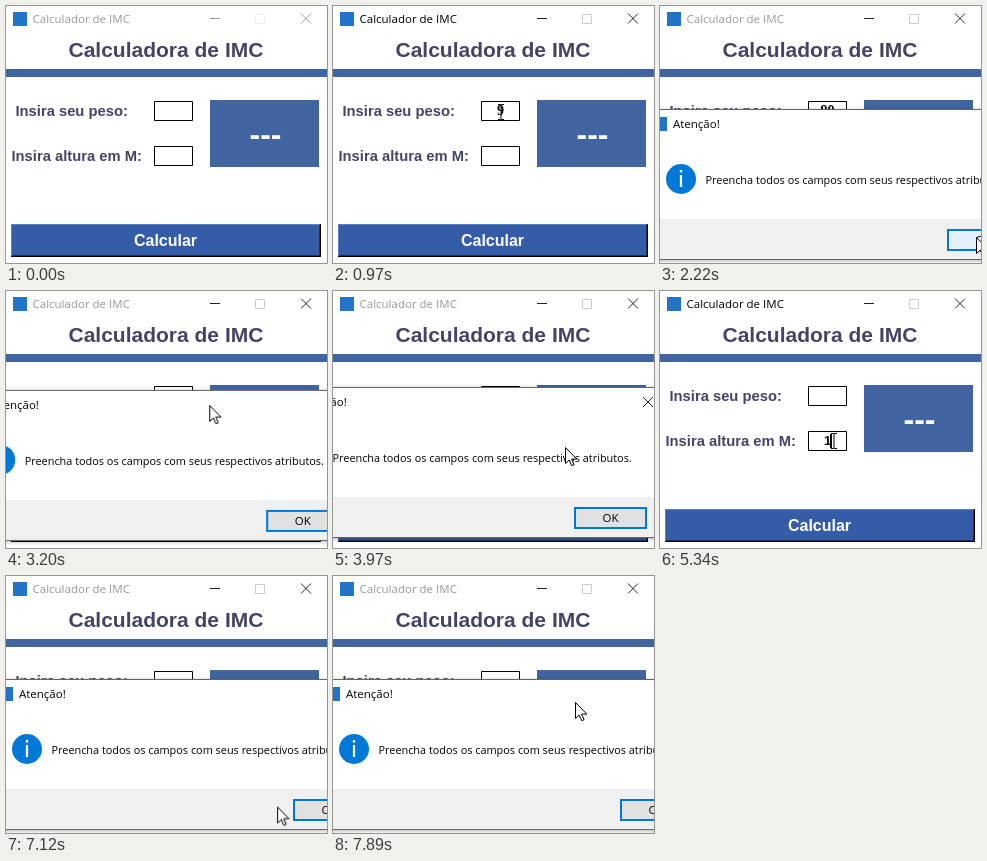
Recreate the animation shown at these times as an HTML page. Size 321 by 257 pixels, loop 8000 ms.

```html
<!DOCTYPE html>
<html lang="pt">
<head>
<meta charset="utf-8">
<title>Calculador de IMC</title>
<style>
html, body { margin: 0; width: 100%; height: 100%; overflow: hidden; background: #fff; }
#stage { position: relative; width: 321px; height: 257px; overflow: hidden; background: #fff; }
#stage > * { position: absolute; left: 0; top: 0; overflow: visible; animation: 8s linear infinite; }
svg * { animation: 8s step-end infinite; }

.ui { font: 11.5px "Open Sans", "Noto Sans", sans-serif; }
.msg { font-size: 10.9px; }
.bold { font: bold 14.75px "Liberation Sans", Arial, sans-serif; fill: #444466; }
.head { font-size: 21px; }
.go { font-size: 16px; fill: #fff; }
.result { font-size: 32px; fill: #fff; }
.line { fill: none; stroke-width: 1; }

#caption { animation-name: caption; }
#controls { animation-name: controls; }
#maximize { animation-name: maximize; }
#raised { animation-name: raised; }
#ridge { animation-name: ridge; }

#stage > .field { width: 39px; left: 148px; height: 20px; line-height: 20px; text-align: center; white-space: pre; }
.field::after { content: ""; animation: 8s step-end infinite; }
#weight { top: 95px; font: bold 14px "Liberation Serif", "Times New Roman", serif; }
#weight::after { animation-name: weight; }
#height { top: 140px; font: bold 13px "Liberation Sans", Arial, sans-serif; }
#height::after { animation-name: height; }
#stage > #caret { top: 143px; width: 2px; height: 14px; background: #000; animation: caret 8s step-end infinite; }

#stage > #dialog { left: -13px; top: 103px; filter: drop-shadow(0 1px 2px rgba(0,0,0,.3));
  animation: popup 8s step-end infinite, drag 8s linear infinite; }
#ok { animation-name: ok; }

#stage > #pointer { animation-name: pointer; }
#arrow { animation-name: arrow; }
#beam { animation-name: beam; }

@keyframes caption {
  0%, 20.65%, 86.3% { fill: #999; }
  7%, 54% { fill: #000; }
  100% { fill: #999; }
}
@keyframes controls { 0% { stroke: #999; } 7%, 100% { stroke: #222; } }
@keyframes maximize { 0% { stroke: #eee; } 7%, 100% { stroke: #ccc; } }
@keyframes raised {
  0%, 2.4%, 23%, 89% { opacity: 1; }
  1.2%, 18.1%, 82.2% { opacity: 0; }
  100% { opacity: 1; }
}
@keyframes ridge {
  0%, 2.4%, 23%, 89% { opacity: 0; }
  1.2%, 18.1%, 82.2% { opacity: 1; }
  100% { opacity: 0; }
}
@keyframes weight {
  0%, 54%, 100% { content: ""; }
  11.2% { content: "9"; }
  12.9% { content: "90"; }
}
@keyframes height {
  0%, 100% { content: ""; }
  66.65% { content: "1"; }
  70.1% { content: "1,"; }
  73.3% { content: "1,7"; }
  75.8% { content: "1,70"; }
}
@keyframes caret {
  0%, 74.2%, 100% { left: 171px; opacity: 0; }
  66.65% { left: 170px; opacity: 1; }
  70.1% { left: 172px; opacity: 1; }
  73.3% { left: 176px; opacity: 1; }
}
@keyframes popup {
  0%, 54.9% { opacity: 0; scale: .965; }
  20.65%, 86.3% { opacity: .16; scale: .965; }
  21.6%, 87.2% { opacity: .5; scale: .98; }
  22.5%, 88.1% { opacity: .8; scale: .993; }
  23.4%, 89% { opacity: 1; scale: 1; }
  53.1% { opacity: .6; scale: .985; }
  54% { opacity: .2; scale: .97; }
  100% { opacity: 1; scale: 1; }
}
@keyframes drag {
  0%, 32.5% { translate: 0 0; }
  41.75% { translate: -33px -5px; }
  45.5%, 60% { translate: -46px -7px; }
  60.1%, 100% { translate: 0 0; }
}
@keyframes ok {
  0%, 28.8%, 55%, 96.2% { fill: #e1e1e1; }
  25.8%, 51.8%, 94.5% { fill: #e5f1fb; }
  100% { fill: #e1e1e1; }
}
@keyframes pointer {
  0%, .8% { translate: 112px 262px; }
  6.1%, 13.75% { translate: 168px 106px; }
  18.75%, 22% { translate: 184px 232px; }
  27%, 28.6% { translate: 316px 231px; }
  32%, 32.5% { translate: 230px 118px; }
  41.75% { translate: 197px 113px; }
  45.5%, 46.8% { translate: 184px 111px; }
  49.5%, 50.5% { translate: 232px 156px; }
  52.3%, 54% { translate: 277px 227px; }
  60%, 76.2% { translate: 174px 150px; }
  83.5%, 87.5% { translate: 263px 232px; }
  95.9% { translate: 308px 224px; }
  98.5%, 100% { translate: 242px 126px; }
}
@keyframes arrow {
  0%, 14.4%, 77% { opacity: 1; }
  5.6%, 59.4% { opacity: 0; }
  100% { opacity: 1; }
}
@keyframes beam {
  0%, 14.4%, 77% { opacity: 0; }
  5.6%, 59.4% { opacity: 1; }
  100% { opacity: 0; }
}
</style>
</head>
<body>
<div id="stage">
  <svg width="321" height="257">
    <rect x="7" y="6" width="14" height="14" fill="#2274c8"/>
    <text id="caption" class="ui" x="26.5" y="17">Calculador de IMC</text>
    <path id="maximize" class="line" d="M249.500 8.500h9v9h-9z"/>
    <path id="controls" class="line" d="M204 12.500h10M295 7.500l10 10M305 7.500l-10 10"/>

    <text class="bold head" x="62.500" y="51">Calculadora de IMC</text>
    <rect y="63" width="321" height="8" fill="#4065a1"/>

    <text class="bold" x="9.500" y="110">Insira seu peso:</text>
    <text class="bold" x="5.500" y="155">Insira altura em M:</text>
    <path class="line" stroke="#000" d="M148.500 95.500h38v19h-38zM148.500 140.500h38v19h-38z"/>

    <rect x="204" y="94" width="109" height="67" fill="#4065a1"/>
    <text class="bold result" x="259.500" y="139" text-anchor="middle">---</text>

    <rect x="5" y="218" width="310" height="33" fill="#355ca6"/>
    <g id="raised" class="line">
      <path d="M5.500 250V218.500H314" stroke="#5d80c4"/>
      <path d="M6 249.500H313.500V219" stroke="#1b3260"/>
      <path d="M5 250.500H314.500V218" stroke="#000"/>
    </g>
    <g id="ridge" class="line">
      <path d="M5.500 250V218.500H314M7 249.500H313.500V220" stroke="#7f9cd6"/>
      <path d="M6.500 249V219.500H313M5 250.500H314.500V218" stroke="#1b3260"/>
    </g>
    <text class="bold go" x="159.500" y="240" text-anchor="middle">Calcular</text>
  </svg>

  <div id="weight" class="field"></div>
  <div id="height" class="field"></div>
  <div id="caret"></div>

  <svg id="dialog" width="397" height="151">
    <rect width="397" height="151" fill="#fff"/>
    <rect y="110" width="397" height="41" fill="#f0f0f0"/>
    <rect class="line" x=".5" y=".5" width="396" height="150" stroke="#666"/>
    <rect x="6" y="8" width="14" height="14" fill="#2274c8"/>
    <text class="ui" x="26" y="19">Atenção!</text>
    <path class="line" stroke="#222" d="M369 10l10 10M379 10l-10 10"/>
    <circle cx="34" cy="70" r="15" fill="#0078d7"/>
    <path fill="#fff" d="M32.800 61h2.400v2.500h-2.400zM32.900 66h2.200v12h-2.200z"/>
    <text class="ui msg" x="58.500" y="75">Preencha todos os campos com seus respectivos atributos.</text>
    <rect id="ok" x="301" y="121" width="71" height="20" stroke="#0078d7" stroke-width="2"/>
    <text class="ui" x="336.500" y="135" text-anchor="middle">OK</text>
  </svg>

  <svg id="pointer" width="14" height="20">
    <path id="arrow" d="M.5 .5v16l3.700-3.500 2.500 5.700 2.400-1-2.500-5.600h5.200z" fill="#fff" stroke="#000"/>
    <path id="beam" class="line" stroke="#000" d="M-3-7.500h2.500l.5.500.5-.5H3M0-7V7M-3 7.500h2.500L0 7l.5.500H3"/>
  </svg>
</div>
</body>
</html>
```
